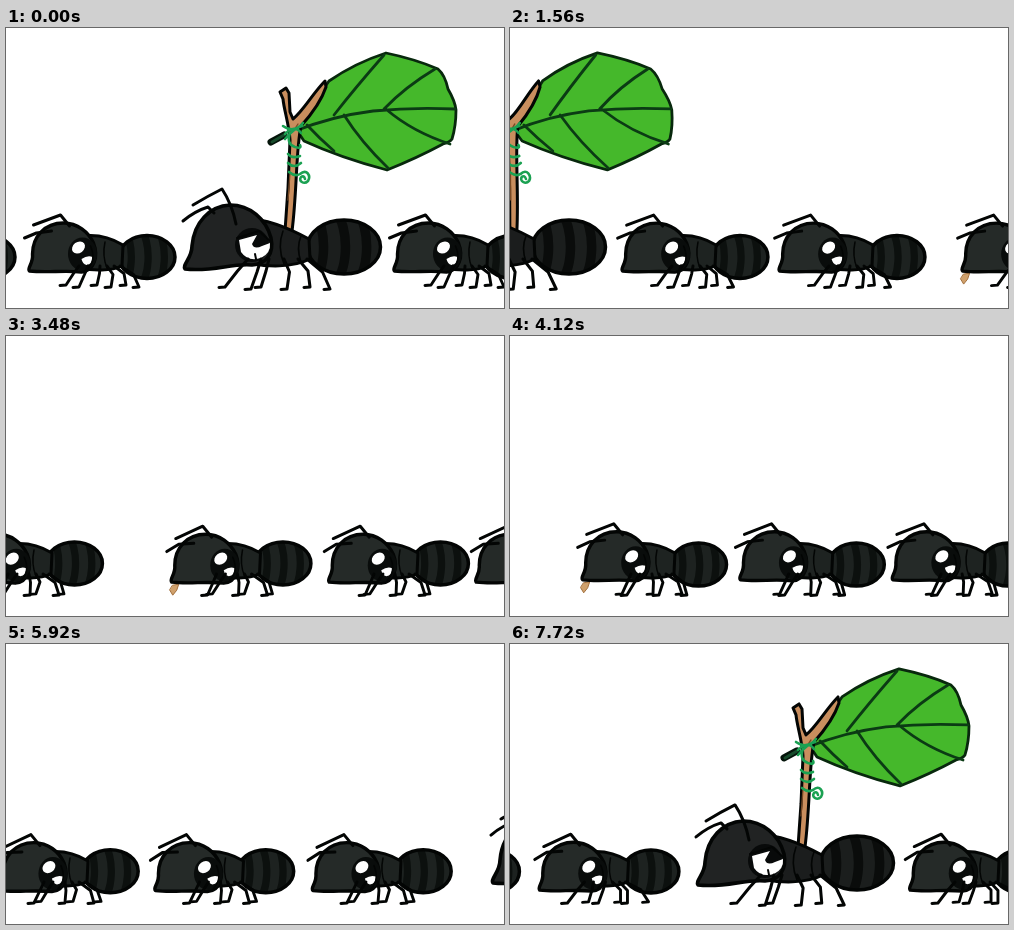
An HTML page with a canvas that plays this animation: 498 by 280 pixels, repeating every 7760 ms.

```html
<!DOCTYPE html>
<html lang="en">
<head>
<meta charset="utf-8">
<title>Marching ants</title>
<style>
html, body { margin: 0; width: 100%; height: 100%; overflow: hidden; background: #fff; }
canvas { display: block; width: 100vw; height: 100vh; }
</style>
</head>
<body>
<canvas id="stage" width="498" height="280"></canvas>
<script>
const LOOP = 7760, STEP = 40, STRIDE = 800;
const ctx = document.getElementById('stage').getContext('2d');
ctx.lineCap = ctx.lineJoin = 'round';

const INK = '#030504';
const SMALL = { head: '#252a28', chest: '#1e2321', tail: '#1d2220', band: '#0c100e' };
const BIG = { head: '#212323', chest: '#1b1d1d', tail: '#1b1e1d', band: '#0a0c0b' };

// Each walker: [time, x] points. x is the body centre, or the nose for the leader.
const walkers = [
  { path: [[-40, 469], [0, 462], [1560, 186]] },
  { path: [[0, 619], [1560, 343], [3480, 26]] },
  { path: [[1560, 526], [3480, 234.5], [4720, 61]], crumb: true },
  { path: [[3480, 392], [4720, 219], [5920, 62]] },
  { path: [[3480, 539], [4720, 376.5], [5920, 217.5], [6840, 88], [7720, -61], [7760, -63], [9320, -340]] },
  { path: [[4720, 533], [5920, 375], [6840, 245.5], [7720, 98.5], [7760, 97], [9320, -181]] }
];
const leader = [[-1840, 485], [-920, 332], [-40, 186], [0, 177], [1560, -102]];
const sway = [[-1840, 0.02], [-920, 0.02], [-40, 0], [0, 0], [1560, -0.075], [2500, -0.075]];

// Linear between points; the end slopes carry on.
function at(points, t) {
  let i = 1;
  while (i < points.length - 1 && t > points[i][0]) i++;
  const [t0, v0] = points[i - 1], [t1, v1] = points[i];
  return v0 + (v1 - v0) * (t - t0) / (t1 - t0);
}

function shape(d, fill, width = 3, stroke = INK) {
  const p = new Path2D(d);
  if (fill) { ctx.fillStyle = fill; ctx.fill(p); }
  if (width) { ctx.strokeStyle = stroke; ctx.lineWidth = width; ctx.stroke(p); }
}

function oval(x, y, rx, ry, fill, turn = 0) {
  ctx.beginPath();
  ctx.ellipse(x, y, rx, ry, turn, 0, Math.PI * 2);
  ctx.fillStyle = fill;
  ctx.fill();
}

function tail(x, y, rx, ry, c) {
  oval(x, y, rx, ry, c.tail);
  ctx.save();
  ctx.clip();
  ctx.strokeStyle = c.band;
  ctx.lineWidth = rx * 0.26;
  for (const k of [-0.62, -0.02, 0.56]) {
    ctx.beginPath();
    ctx.ellipse(x + (k - 0.28) * rx, y, rx * 0.34, ry * 1.25, 0, -1.4, 1.4);
    ctx.stroke();
  }
  ctx.restore();
  ctx.beginPath();
  ctx.ellipse(x, y, rx, ry, 0, 0, Math.PI * 2);
  ctx.strokeStyle = INK;
  ctx.lineWidth = 3.5;
  ctx.stroke();
}

function legs(hips, feet, top, ground, phase, reach, width) {
  ctx.strokeStyle = INK;
  ctx.lineWidth = width;
  feet.forEach((foot, i) => {
    const a = phase + i * Math.PI;
    const x = foot + reach * Math.sin(a);
    const y = ground - 2 * Math.max(0, Math.cos(a));
    const knee = (hips[i] + x) / 2 + (i < 3 ? 1 : 4);
    ctx.beginPath();
    ctx.moveTo(hips[i], top);
    ctx.lineTo(knee, (top + y) / 2 - 2);
    ctx.lineTo(x, y);
    ctx.lineTo(x - 6, y + 0.5);
    ctx.stroke();
  });
}

function smallAnt(x, t, crumb) {
  const phase = t / STRIDE * Math.PI * 2;
  const up = (1 + Math.cos(phase)) / 2;
  ctx.save();
  ctx.translate(x, 0);
  tail(42 + 2 * up, 227 + 2 * up, 28, 21.5, SMALL);
  shape('M-20 208C-4 206 10 211 20 217L19 238C8 243-10 243-22 240Z', SMALL.chest);
  shape('M2 214Q-1 228 4 240', null, 1.5);

  ctx.save();
  ctx.translate(4.5 - 6 * up, 4 - 4 * up);
  if (crumb) shape('M-71 246L-65 245L-67 251L-71 256L-74 251Z', '#d0a16c', 1, '#a3713f');
  shape('M-72 243C-75 240-68 236-69 226C-69 209-57 195-38 195C-24 195-13 204-8 215' +
    'C-3 228-7 243-20 244C-38 242-54 245-72 243Z', SMALL.head, 3.4);
  const drop = 3 * (1 - up);
  shape(`M-68 ${197 + drop}L-41 187L-32 198`, null, 3);
  shape(`M-77 ${210 + drop}L-65 205L-50 ${203 + drop / 2}`, null, 3);
  oval(-19, 226, 14.5, 16.5, '#090c0b');
  oval(-23, 219.5, 7, 5.5, '#fff', -0.65);
  shape('M-20 231Q-14 227-9 229Q-9 236-15 237Q-19 236-20 231Z', '#fff', 0);
  shape('M-11 218Q-5 232-14 241', null, 1.5);
  ctx.restore();

  legs([-24, -15, -3, 4, 11, 17], [-37, -24, -6, 8, 23, 36], 238, 259, phase, 5, 2.9);
  ctx.restore();
}

function plant() {
  shape('M113 101L146 53Q172 35 203 25Q232 31 255 41Q262 47 265 61Q272 73 273 82' +
    'Q273 98 269 111Q267 114 260 116Q234 130 204 142Q158 130 121 113Z',
    '#45b82b', 2.8, '#08280d');
  shape('M112 103Q150 88 190 83Q230 79 272 81' +
    'M151 87Q172 60 201 27M201 81Q222 59 252 41' +
    'M124 97Q136 110 151 123M161 87Q178 114 205 140M204 82Q230 104 267 116',
    null, 2.8, '#0b3b14');
  shape('M88 114L101 107', null, 7, '#04140a');
  shape('M89 114L101 107', null, 3, '#174b2b');
  shape('M102 203L105 160L107 112C106 96 101 82 100 71L97 64L103 60L106 65L107 84L110 91' +
    'C121 82 130 65 142 53L143 59C138 74 127 88 118 98C113 119 114 165 109 203Z',
    '#c98e5e', 3);
  shape('M105 172L107 145M111 102L115 96', null, 1.3, '#774924');
  shape('M100 98Q111 106 120 95M102 106Q112 96 118 105M102 111Q111 100 119 98' +
    'M107 105Q103 116 112 119Q119 121 117 117M105 126Q109 131 117 128' +
    'M105 135Q111 141 118 135M106 144Q112 149 117 146' +
    'C124 140 128 148 125 153C121 157 115 153 118 149Q121 147 122 151',
    null, 2.6, '#1ba152');
}

function bigAnt(x, t) {
  const phase = t / STRIDE * Math.PI * 2;
  const up = (1 + Math.cos(phase)) / 2;
  ctx.save();
  ctx.translate(x, 0);

  const lean = at(sway, t);
  ctx.save();
  ctx.transform(1, 0, -lean, 1, lean * 205, -2 * (1 - up));
  plant();
  ctx.restore();

  tail(161, 219, 36.5, 27, BIG);
  shape('M62 191C82 190 104 199 126 211L127 231C109 240 84 239 66 235Z', BIG.chest);
  shape('M100 203Q94 219 101 236M118 208Q113 220 118 234', null, 1.6);

  ctx.save();
  ctx.translate(0, -3 * (1 - up));
  shape('M2 241C-1 237 9 230 9 218C11 194 27 178 47 177C67 177 83 191 88 210' +
    'C91 225 84 236 69 237C48 235 31 244 2 241Z', BIG.head, 3.6);
  shape('M10 177Q25 168 39 161Q49 176 53 196', null, 3);
  shape('M0 193Q12 183 25 179L31 185', null, 3);
  oval(69, 217, 17, 17, '#080a0a');
  shape('M56 212L74 207L69 216Q71 222 79 218L87 215Q88 225 78 230Q65 234 58 224Z', '#fff', 0);
  shape('M54 210L76 203L87 213M72 226L73 231', null, 2);
  ctx.restore();

  legs([65, 78, 86, 101, 115, 124], [42, 68, 78, 104, 127, 147], 231, 261, phase, 4, 3);
  ctx.restore();
}

function draw(t) {
  ctx.fillStyle = '#fff';
  ctx.fillRect(0, 0, 498, 280);
  // Neighbouring laps keep walkers on stage across the seam.
  for (const time of [t - LOOP, t, t + LOOP]) {
    for (const { path, crumb } of walkers) {
      const x = at(path, time);
      if (x > -90 && x < 590) smallAnt(x, t, crumb);
    }
    const x = at(leader, time);
    if (x > -290 && x < 510) bigAnt(x, t === time ? t : time);
  }
}

const start = performance.now();
function tick() {
  const t = (performance.now() - start) % LOOP;
  draw(Math.floor(t / STEP) * STEP);
  requestAnimationFrame(tick);
}
tick();
</script>
</body>
</html>
```
